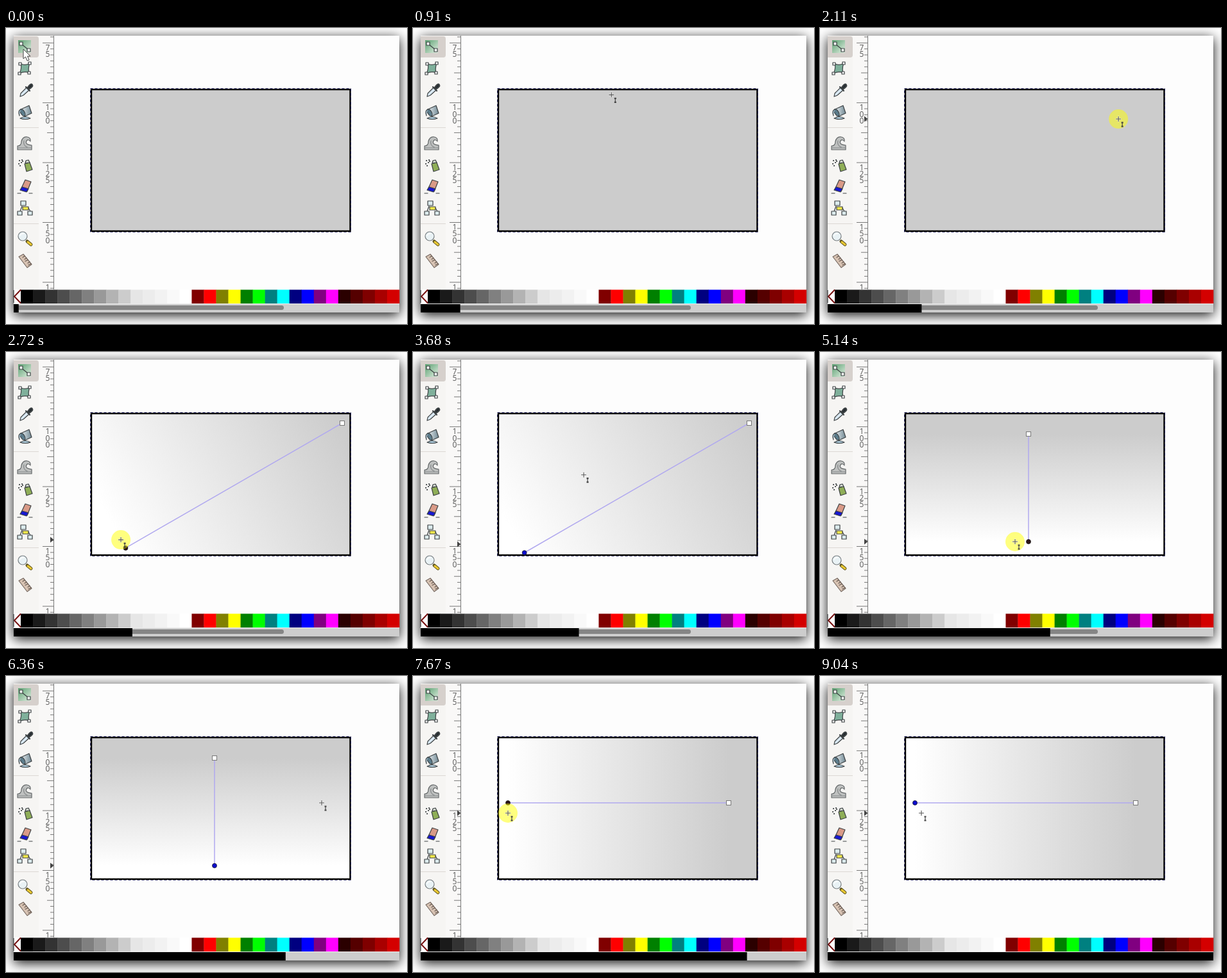
Recreate the animation shown at these times as an HTML page. Size 625x462 px, loop 9100 ms.

```html
<!DOCTYPE html>
<html lang="en">
<head>
<meta charset="utf-8">
<title>Linear gradient tool</title>
<style>
html, body { margin: 0; width: 100%; height: 100%; overflow: hidden; background: #fff; }
.window { position: absolute; left: 12px; top: 12px; width: 601px; height: 432px; background: #fdfdfd; box-shadow: 0 4px 18px rgba(0, 0, 0, .95); }
svg { position: absolute; left: 0; top: 0; display: block; }
.icon { fill: none; stroke: #3d4244; stroke-width: 1.2; stroke-linejoin: round; stroke-linecap: round; }
.ruler text { font: 12px "Open Sans", "Noto Sans", sans-serif; fill: #555; text-anchor: middle; }
</style>
</head>
<body>
<div class="window"></div>
<svg width="625" height="462" viewBox="0 0 625 462">
  <defs>
    <linearGradient id="fill" gradientUnits="userSpaceOnUse">
      <stop stop-color="#ccc"/><stop offset="1" stop-color="#fff"/>
    </linearGradient>
    <linearGradient id="green" x2="1" y2="1">
      <stop stop-color="#5a9f70"/><stop offset="1" stop-color="#e2efe2"/>
    </linearGradient>
    <linearGradient id="steel" x2="1">
      <stop stop-color="#eef3f5"/><stop offset="1" stop-color="#6f8792"/>
    </linearGradient>
    <clipPath id="rulerClip"><rect x="51" y="12" width="26" height="396"/></clipPath>
  </defs>

  <rect x="12" y="12" width="63" height="396" fill="#f9f8f7"/>
  <rect x="12" y="12" width="39" height="396" fill="#f6f5f3"/>
  <path d="M12 13H47a4 4 0 0 1 4 4V42a4 4 0 0 1-4 4H12z" fill="#d6d0cc"/>
  <path d="M12 155.5H51M12 305.5H51" stroke="#dcd8d4"/>

  <g class="icon">
    <g transform="translate(29 29)">
      <rect x="-10" y="-10" width="20" height="20" fill="url(#green)" stroke="none"/>
      <path d="M-5-4L6 5"/>
      <path d="M-8-7h5v5h-5zM4 3h5v5h-5z" fill="#f4f8f4"/>
    </g>
    <g transform="translate(29 63)">
      <path d="M-6-7Q2-4 8-8Q5 0 7 7Q0 4-8 8Q-4 0-6-7z" fill="#7fb09b"/>
      <path d="M-9-9h4v4h-4zM6-10h4v4h-4zM5 5h4v4h-4zM-10 6h4v4h-4z" fill="#fff"/>
    </g>
    <g transform="translate(31 97)">
      <path d="M1-4L-8 5L-9 10L-4 8L5 0z" fill="#d9e8f2"/>
      <path d="M0-5L6 1M2-3L6-8Q9-11 10-8Q11-6 8-4L4-1z" fill="#20282c" stroke-width="2.2"/>
    </g>
    <g transform="translate(30 131)">
      <path d="M-7-4L6-10L10 2L-1 7z" fill="url(#steel)"/>
      <ellipse cx="-4" cy="1" rx="3" ry="6" transform="rotate(-30 -4 1)" fill="#5c7c8b"/>
      <path d="M-7-4Q-12-2-9 6M-8 10Q0 5 8 10Q0 13-8 10z" fill="#a9c6d6"/>
    </g>
    <g transform="translate(29 180)">
      <path d="M-11 4Q-5 4-5-3Q-3-11 4-10Q10-9 9-3Q6-7 3-4Q0 2 11 3V10H-11z" fill="#bfc1c0" stroke="#626667"/>
      <path d="M-10 7H10M-1-4Q-3 3 4 6" stroke="#85898a"/>
    </g>
    <g transform="translate(30 214)">
      <path d="M-1-2L7-4L11 7L2 10z" fill="#8fae57"/>
      <path d="M0-3L1-7L5-8L7-4z" fill="#d0d5ce"/>
      <path d="M-9-7h.1M-6-4h.1M-10-2h.1M-5-8h.1M-4-6h.1M-8 1h.1" stroke-width="2.2"/>
    </g>
    <g transform="translate(30 247)">
      <path d="M0-10L9-7L3 8L-7 5z" fill="#d99a87"/>
      <path d="M-5 1L5 4L2 9L-8 6z" fill="#1717d2"/>
      <path d="M-12 11H-7M6 11H11"/>
    </g>
    <g transform="translate(30 281)">
      <path d="M-5-3L-8 5M5 0L8 5"/>
      <path d="M-7-11h8v7h-8zM-12 5h7v6h-7zM4 5h7v6h-7z" fill="#dcebed"/>
      <path d="M-4-2h9v5h-9z" fill="#f3e84b"/>
    </g>
    <g transform="translate(29 329)">
      <path d="M4 4L10 9" stroke="#5e5420" stroke-width="5"/>
      <path d="M5 5L10 9" stroke="#e9c832" stroke-width="3"/>
      <circle cx="-3" cy="-4" r="7" fill="#e9f2f5" stroke="#777d80"/>
      <path d="M-7-5Q-5-9-1-8" stroke="#fff"/>
    </g>
    <g transform="translate(30 363)">
      <path d="M-10-6L-3-10L10 6L3 11z" fill="#d8c3b3" stroke="#776a62"/>
      <path d="M-1-7l-3 2M2-4l-3 2M4-1l-4 2M7 2l-3 2M9 5l-4 2" stroke="#665950"/>
    </g>
  </g>

  <g class="ruler" id="ruler" clip-path="url(#rulerClip)"></g>
  <path id="marker" d="M69-4.5L74.5 0L69 4.5z" fill="#444"/>

  <rect id="shape" x="133" y="96" width="403.5" height="221" stroke="#000" stroke-width="2.4"/>
  <rect x="131.5" y="94.5" width="406" height="224" fill="none" stroke="#23235f" stroke-dasharray="4 3"/>

  <g id="handles">
    <line id="axis" stroke="#b1a9ef" stroke-width="1.5"/>
    <rect id="startHandle" x="-3.5" y="-3.5" width="7" height="7" fill="#fff" stroke="#777"/>
    <circle id="endHandle" r="3.5" stroke="#222" stroke-width=".8"/>
  </g>

  <g id="palette"></g>
  <rect x="12" y="408" width="11" height="22" fill="#fff"/>
  <path d="M23 408.5L13 419L23 429.5" fill="none" stroke="#711" stroke-width="2"/>
  <path d="M12 409V429" stroke="#222"/>
  <rect x="12" y="430" width="601" height="14" fill="#cdcdcd"/>
  <path d="M12 430.5H613" stroke="#eee"/>
  <rect x="13" y="433" width="420" height="7" rx="3.5" fill="#858585"/>
  <rect id="progress" x="12" y="431" height="13"/>

  <g id="cursor">
    <circle id="press" r="15" fill="#ff0" fill-opacity=".5"/>
    <g id="cross" fill="none">
      <path d="M-4.5 0H4.5M0-4.5V4.5" stroke="#fff" stroke-opacity=".6" stroke-width="2.6"/>
      <path d="M-4 0H4M0-4V4" stroke="#555" stroke-width="1.1"/>
      <path d="M6 5V12" stroke="#444" stroke-width="1.2"/>
      <path d="M4.5 5.5H7.5M4.5 11.5H7.5" stroke="#444" stroke-width="2.2"/>
    </g>
    <path id="arrow" d="M0 0V15L3.5 12L6 18L9 17L6.5 11H11z" fill="#fff" stroke="#444" stroke-linejoin="round"/>
  </g>
</svg>
<script>
const LOOP = 9100, STEPS = 78, STEP = LOOP / STEPS;
const DRAG_DELAY = 300;
const SNAP = Math.PI / 12;
const $ = id => document.getElementById(id);

function set(node, attrs) {
  for (const name in attrs) node.setAttribute(name, attrs[name]);
}
function add(parent, tag, attrs, text = "") {
  const node = document.createElementNS("http://www.w3.org/2000/svg", tag);
  set(node, attrs);
  node.textContent = text;
  parent.append(node);
}
const show = (node, on) => set(node, { visibility: on ? "visible" : "hidden" });
const place = (node, x, y) => set(node, { transform: `translate(${x} ${y})` });
const clamp = (v, low, high) => Math.min(high, Math.max(low, v));

function buildRuler() {
  const top = 23.3, spacing = 93.4;
  let ticks = "M74.5 12V408";
  for (let i = -1; i < 42; i++) {
    const length = i % 10 === 0 ? 17 : i % 5 === 0 ? 10 : 5;
    ticks += `M74 ${top + i * spacing / 10}h${-length}`;
  }
  add($("ruler"), "path", { d: ticks, stroke: "#777", fill: "none" });
  for (let i = 0; i < 5; i++)
    [...String(75 + 25 * i)].forEach((digit, k) =>
      add($("ruler"), "text", { x: 65, y: top + 11.7 + i * spacing + k * 10.2 }, digit));
}

function buildPalette() {
  const grays = Array.from({ length: 10 }, (_, i) => `hsl(0 0% ${i * 10}%)`);
  const tints = [92.5, 95, 97.5, 100].map(light => `hsl(0 0% ${light}%)`);
  const hues = [0, 60, 120, 180, 240, 300].flatMap(hue => [25, 50].map(light => `hsl(${hue} 100% ${light}%)`));
  const reds = [1, 2, 3, 4, 5].map(i => `hsl(0 100% ${i * 8.3}%)`);
  const colors = [...grays, ...tints, ...hues, ...reds];
  const width = 590 / colors.length;
  colors.forEach((fill, i) =>
    add($("palette"), "rect", { x: 23 + i * width, y: 408.5, width: width + .3, height: 21.5, fill }));
}

// The pointer's moves in order; it rests between them, keeping the button down after a drag.
const moves = [
  { start: 150, length: 1280, to: [569, 170] },
  { start: 1430, length: 500, to: [524, 111] },
  { start: 1980, length: 730, to: [166, 300], drag: true },
  { start: 3050, length: 900, to: [325, 128] },
  { start: 4420, length: 515, to: [304, 296], drag: true },
  { start: 5300, length: 900, to: [492, 198] },
  { start: 6590, length: 960, to: [148, 214], drag: true },
  { start: 7850, length: 300, to: [158, 214] }
];
moves.forEach((move, i) => move.from = i ? moves[i - 1].to : [27, 33]);
const drags = moves.filter(move => move.drag);

function along({ start, length, from, to }, t) {
  const p = clamp((t - start) / length, 0, 1);
  return from.map((v, i) => v + (to[i] - v) * p);
}

// Projects a point onto the nearest 15° direction from the drag's start.
function snapped([x1, y1], [x, y]) {
  const dx = x - x1, dy = y - y1;
  const angle = Math.round(Math.atan2(dy, dx) / SNAP) * SNAP;
  const cos = Math.cos(angle), sin = Math.sin(angle);
  const reach = dx * cos + dy * sin;
  return [x1 + reach * cos, y1 + reach * sin];
}

function drawGradient(t, pressed) {
  const drag = drags.findLast(d => t >= d.start + DRAG_DELAY);
  show($("handles"), drag);
  set($("shape"), { fill: drag ? "url(#fill)" : "#ccc" });
  if (!drag) return;
  const [x1, y1] = drag.from, [x2, y2] = snapped(drag.from, along(drag, t));
  set($("fill"), { x1, y1, x2, y2 });
  set($("axis"), { x1, y1, x2, y2 });
  place($("startHandle"), x1, y1);
  place($("endHandle"), x2, y2);
  set($("endHandle"), { fill: pressed === drag ? "#2b1416" : "#0c0cd0" });
}

function draw(index) {
  const t = index * STEP;
  const move = moves.findLast(m => t >= m.start) ?? moves[0];
  const pressed = move.drag && move;
  const [x, y] = along(move, t);
  const onCanvas = x > 75;
  place($("cursor"), x, y);
  show($("cross"), onCanvas);
  show($("arrow"), !onCanvas);
  show($("press"), pressed);

  const lastDrag = drags.findLast(d => t >= d.start) ?? drags[0];
  show($("marker"), move !== moves[0] || t > STEP * 8);
  place($("marker"), 0, along(lastDrag, t)[1]);
  set($("progress"), { width: 601 * (index + 1) / STEPS });
  drawGradient(t, pressed);
}

buildRuler();
buildPalette();
const origin = performance.now();
let shown = -1;
function tick(now) {
  const time = Math.max(0, now - origin) % LOOP;
  const index = Math.min(STEPS - 1, Math.floor((time + 20) / STEP));
  if (index !== shown) draw(shown = index);
  requestAnimationFrame(tick);
}
tick(origin);
</script>
</body>
</html>
```
